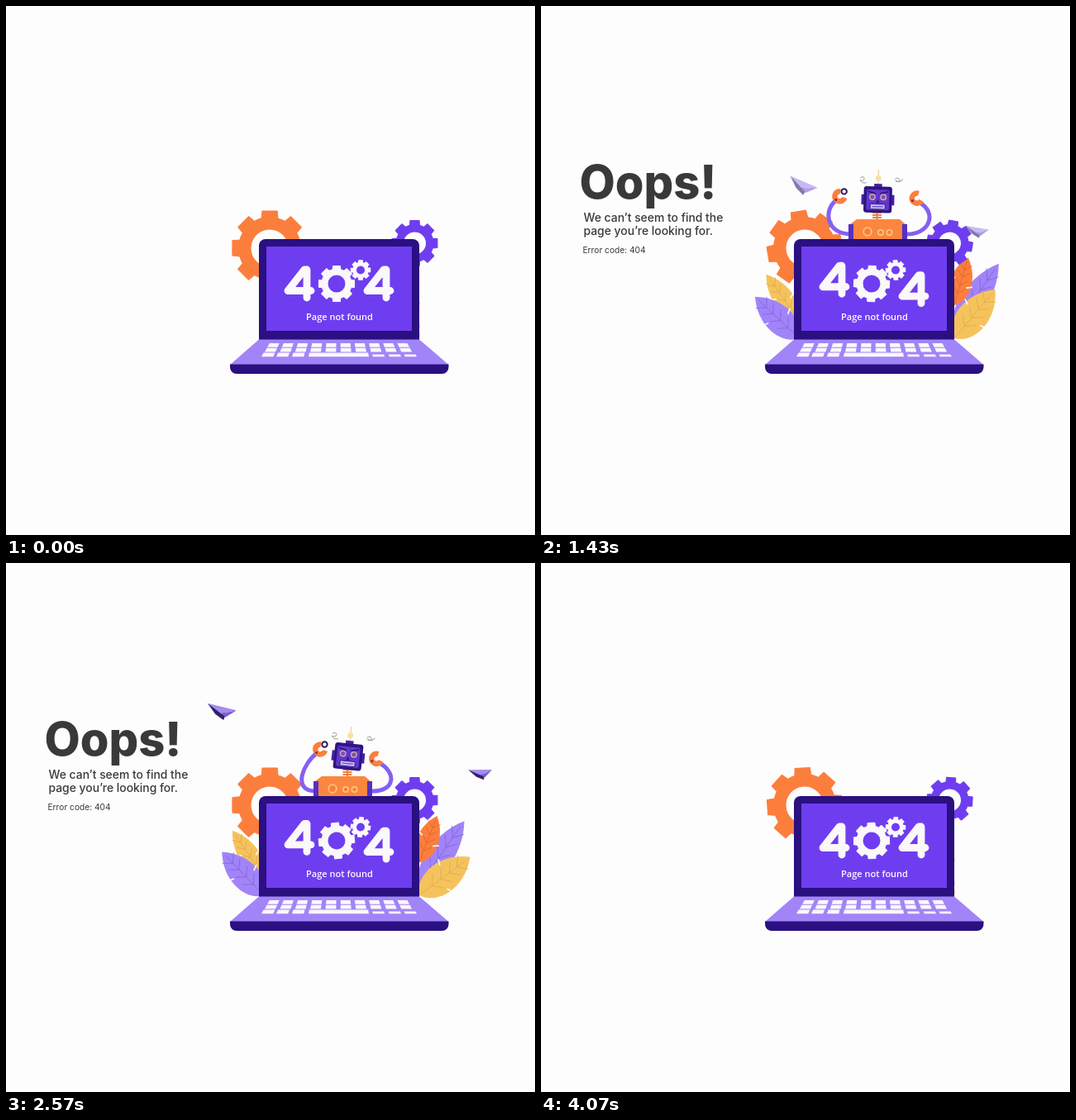
These frames come from a looping animation (640x640 px, 4.11 s). An HTML page:

```html
<!DOCTYPE html>
<html lang="en">
<head>
<meta charset="utf-8">
<title>404</title>
<style>
  html, body { margin: 0; width: 100%; height: 100%; overflow: hidden; background: #fdfdfd; }
  svg { display: block; width: 100vw; height: 100vh; }
  .copy { fill: #39393c; font: 500 13.9px Inter, sans-serif; }
  #title { font: 800 56px Inter, sans-serif; }
  #code { font: 400 10.2px Inter, sans-serif; }
  .screen { fill: #fdfbff; font: 600 11px "Open Sans", "Noto Sans", sans-serif; text-anchor: middle; }
  .four { fill: none; stroke: #faf8fb; stroke-width: 8.8; stroke-linecap: round; stroke-linejoin: round; }
</style>
</head>
<body>
<svg id="stage" viewBox="0 0 640 640"></svg>
<script>
const LOOP = 4110;
const ORANGE = '#fc7e3d', PURPLE = '#6f3df0', LILAC = '#a184f8', DARK = '#2a1080',
      YELLOW = '#f5c35c', CREAM = '#faf8fb', PAPER = '#fdfdfd';

// Smooth curve through time/value pairs, flat at its extremes.
function track(...p) {
  const n = p.length / 2, T = i => p[2 * i], V = i => p[2 * i + 1];
  const rate = i => (V(i + 1) - V(i)) / (T(i + 1) - T(i));
  const tangent = i => {
    if (i < 1 || i > n - 2) return 0;
    const a = rate(i - 1), b = rate(i);
    return a * b > 0 ? 2 * a * b / (a + b) : 0;
  };
  return t => {
    if (t <= T(0)) return V(0);
    if (t >= T(n - 1)) return V(n - 1);
    let i = 0;
    while (t > T(i + 1)) i++;
    const d = T(i + 1) - T(i), u = (t - T(i)) / d, w = 1 - u;
    return V(i) * (1 + 2 * u) * w * w + V(i + 1) * u * u * (3 - 2 * u)
      + d * u * w * (tangent(i) * w - tangent(i + 1) * u);
  };
}

function gear(id, R, r, hole, color) {
  const at = (rad, a) => `${(rad * Math.sin(a)).toFixed(2)} ${(-rad * Math.cos(a)).toFixed(2)}`;
  let d = '';
  for (let i = 0; i < 8; i++) {
    const a = i * Math.PI / 4;
    d += (i ? `A${r} ${r} 0 0 1 ` : 'M') + at(r, a - .27)
      + 'L' + at(R, a - .2) + 'L' + at(R, a + .2) + 'L' + at(r, a + .27);
  }
  d += `A${r} ${r} 0 0 1 ${at(r, -.27)}ZM${hole} 0A${hole} ${hole} 0 1 0 ${-hole} 0A${hole} ${hole} 0 1 0 ${hole} 0Z`;
  return `<path id="${id}" d="${d}" fill="${color}" fill-rule="evenodd" stroke="${color}" stroke-linejoin="round"/>`;
}

function leaf(id, len, w, color, vein) {
  const y = k => -k * len;
  let ribs = '';
  for (const k of [.25, .42, .59, .74])
    ribs += `M0 ${y(k)}L${-w * .5} ${y(k + .12)}M0 ${y(k)}L${w * .5} ${y(k + .12)}`;
  return `<g id="${id}">
    <path fill="${color}" d="M0 0C${-w} ${y(.12)} ${-w * 1.35} ${y(.62)} 0 ${y(1)}C${w * 1.35} ${y(.62)} ${w} ${y(.12)} 0 0"/>
    <path d="M${w} ${y(.45)}l-7 3M${-w} ${y(.58)}l7 3" stroke="${PAPER}" stroke-width="1.6"/>
    <path d="M0 0V${y(.92)}${ribs}" fill="none" stroke="${vein}" stroke-width=".7"/></g>`;
}

function keys() {
  const X = (u, y) => 403 + u * (86 + (y - 408) * .55);
  const key = (a, b, y, h) =>
    `M${X(a, y)} ${y}L${X(b, y)} ${y}L${X(b, y + h)} ${y + h}L${X(a, y + h)} ${y + h}Z`;
  let d = '';
  for (const y of [408, 413.8])
    for (let i = 0; i < 10; i++) d += key(i / 5 - .98, i / 5 - .84, y, 4.7);
  for (const a of [-.99, -.8, -.6]) d += key(a, a + .15, 419.4, 4.8);
  d += key(-.39, .38, 419.4, 4.8);
  for (const a of [.43, .64, .84]) d += key(a, a + .15, 421.6, 2.6);
  return `<path d="${d}" fill="${CREAM}"/>`;
}

const claw = `<path d="M2 -6.5A6 6 0 1 0 7 1" fill="none" stroke="${ORANGE}" stroke-width="6.5"/>
  <circle cx="-3.5" cy="3.5" r="1.6" fill="#7a3550"/>`;
const eye = x => `<circle cx="${x}" cy="-3" r="4.2" fill="#c9a5a8"/><circle cx="${x}" cy="-3" r="2.6" fill="#7b4fae"/>`;
const plane = id => `<g id="${id}">
  <path d="M-17 -11L-9 3L0 11L4 4Z" fill="#33206b"/>
  <path d="M-17 -11L17 1L-2 3Z" fill="#a48cf0"/>
  <path d="M-2 3L17 1L3 8Z" fill="#7b5fd6"/></g>`;
const four = (id, x) => `<path id="${id}" class="four" d="M${x + 28} 353V319H${x + 25}L${x + 5} 344.5H${x + 33}"/>`;

stage.innerHTML = `
  ${leaf('ly', 68, 14, YELLOW, '#dda850')}${leaf('lp', 73, 19, LILAC, '#7d61dc')}
  ${leaf('rp', 95, 18, LILAC, '#7d61dc')}${leaf('ry', 77, 21, YELLOW, '#dda850')}
  ${leaf('ro', 60, 15, ORANGE, '#d9652c')}
  ${gear('bigGear', 46, 37.5, 23, ORANGE)}${gear('sideGear', 28, 22.5, 14, PURPLE)}
  <g id="robot">
    <g fill="none" stroke="#8560f2" stroke-width="5"><path id="armL"/><path id="armR"/></g>
    <g id="handL">${claw}<circle cx="6.5" cy="-6.5" r="3.2" fill="${PAPER}" stroke="#2b1763" stroke-width="2"/></g>
    <g id="handR">${claw}</g>
    <path id="neck" d="M-5.5 250H5.5M-5.5 253H5.5M-5.5 256H5.5M0 248V260" stroke="#ee8145" stroke-width="2.2"/>
    <path d="M382 258H434L441 264V290H374V264Z" fill="#fb863f"/>
    <path d="M372 264h6v26h-6zM437 264h6v26h-6z" fill="#5630c4"/>
    <g fill="${ORANGE}" stroke="#fac47a" stroke-width="1.8"><circle cx="395" cy="273" r="4.8"/>
      <circle cx="411" cy="274" r="3.2"/><circle cx="421.5" cy="274" r="3.2"/></g>
    <g id="head">
      <path d="M0 -18V-38" stroke="#e9cf8c" stroke-width="1.2"/><circle cy="-27" r="3.6" fill="#f6e0a4"/>
      <path d="M-5 -20H5V-15H-5ZM-21 -6H21V7H-21Z" fill="#4522a8"/>
      <rect x="-18" y="-16.5" width="36" height="33.5" rx="3.5" fill="#2f1580"/>
      <rect x="-14.5" y="-12.5" width="29" height="26" rx="2" fill="#6036cf"/>
      <path d="M-13 -10L-3 -7.5M13 -10L3 -7.5" stroke="#2f1580" stroke-width="1.8"/>
      ${eye(-7)}${eye(7)}
      <path d="M0 0L2.5 4.5H-2.5Z" fill="#2f1580"/>
      <rect x="-9.5" y="6" width="19" height="6.5" rx="1" fill="#cbbcf6" stroke="#2f1580"/>
      <path d="M-7 9.2H7" stroke="#6843cf" stroke-width="1.2"/>
      <g id="curls" fill="none" stroke="#8b8b92" stroke-width=".9">
        <path d="M-23 -27q5 -3 5 1t-5 2q2 5 8 3"/><path d="M21 -26q4 -4 6 0t-5 2q8 2 9 -3"/></g>
    </g>
  </g>
  <path d="M306 404V290a8 8 0 0 1 8 -8H492a8 8 0 0 1 8 8V404Z" fill="${DARK}"/>
  <path d="M315 291H491V393H315Z" fill="${PURPLE}"/>
  <path d="M306 403.500H500L535.500 434H271Z" fill="${LILAC}"/>
  <path d="M271 433.500H535.500V437a8 8 0 0 1 -8 8H279a8 8 0 0 1 -8 -8Z" fill="${DARK}"/>
  ${keys()}
  ${four('fourL', 336)}${four('fourR', 432)}
  ${gear('zero', 22, 18, 11, CREAM)}${gear('tiny', 12, 9.3, 5.5, CREAM)}
  <text class="screen" x="403.500" y="379.500">Page not found</text>
  ${plane('planeL')}${plane('planeR')}
  <text id="title" class="copy" x="46.500" y="233">Oops!</text>
  <text id="body" class="copy"><tspan x="51.500" y="261">We can’t seem to find the</tspan><tspan x="51.500" y="277">page you’re looking for.</tspan></text>
  <text id="code" class="copy" x="50.500" y="298.500">Error code: 404</text>`;

const $ = id => document.getElementById(id);
const place = (id, x, y, turn = 0, size = 1) =>
  $(id).setAttribute('transform', `translate(${x} ${y}) rotate(${turn}) scale(${size})`);
const fade = (id, v) => $(id).setAttribute('opacity', v);
// Values at the main poses.
const poses = (a, b, c, d, e) => track(570, a, 1030, b, 1830, c, 2570, d, 3570, e);
const sway = (start, a, b, c, d, e) =>
  track(80, start, 570, a, 1030, b, 1830, c, 2570, d, 3150, d, 3570, e, 3950, start);

const leaves = [
  ['ly', 312, 380, sway(40, -32, -38, -33, -34, -29)],
  ['lp', 312, 402, sway(40, -22, -51, -42, -44, -23)],
  ['rp', 500, 390, sway(-40, 30, 36, 33, 35, 30)],
  ['ry', 500, 402, sway(-45, 19, 42, 38, 53, 39)],
  ['ro', 500, 362, sway(-45, 10, 15, 17, 21, 9)],
];
const grow = {
  lp: track(80, .5, 570, 1, 3300, 1, 3570, .93, 3950, .5),
  rp: track(80, .4, 570, 1, 3200, 1, 3570, .73, 3950, .4),
  ry: track(80, .4, 570, .92, 1030, 1, 3200, 1, 3570, .72, 3950, .4),
  ro: track(80, .4, 570, .8, 1030, 1, 3200, 1, 3570, .6, 3950, .4),
};
const rise = track(60, 112, 570, 24, 1030, 0, 3150, 0, 3570, 35, 3950, 112);
const headX = poses(412, 405, 411, 414, 417), tilt = poses(-2, 0, 3, 6, 7);
const leftX = poses(373, 359, 363, 379, 386), leftY = poses(228, 232, 229, 226, 227);
const rightX = poses(453, 460, 447, 447, 463), rightY = poses(239, 237, 230, 237, 246);
const curlFade = track(820, 0, 1030, 1, 3000, 1, 3300, 0);
const planeFade = track(1150, 0, 1650, 1, 3150, 1, 3680, 0);
const flight = (a, b, c, d, e) => track(1200, a, 1830, b, 2570, c, 3200, d, 3680, e);
const pLX = flight(322, 301, 262, 243, 237), pLY = flight(221, 205, 179, 171, 167);
const pRX = flight(525, 542, 575, 590, 593), pRY = flight(274, 265, 254, 250, 249);
const pTurn = flight(5, 0, -6, -8, -8);
const copy = [
  ['title', track(120, 0, 570, .58, 900, 1, 3450, 1, 3570, .86, 4075, 0), 38, 1335],
  ['body', track(180, 0, 570, .48, 920, 1, 3520, 1, 4070, 0), 56, 1456],
  ['code', track(240, 0, 570, .42, 950, 1, 3520, 1, 4070, 0), 56, 1456],
];

function draw(t) {
  const turn = t / LOOP * 360;
  place('bigGear', 319, 293, turn);
  place('sideGear', 494.5, 287, -turn);
  place('zero', 400, 336, turn * .375);
  place('tiny', 429, 319.5, -turn * .375);
  // The digits part twice per loop and hold for a moment.
  const part = Math.min(1, 1.3 * Math.sin(turn * Math.PI / 180) ** 2);
  const bob = part * part * (3 - 2 * part);
  place('fourL', 0, -5 * bob);
  place('fourR', 0, 7 * bob);

  for (const [id, x, y, angle] of leaves)
    place(id, x, y, angle(t), grow[id] ? grow[id](t) : 1);

  const lx = leftX(t), ly = leftY(t), rx = rightX(t), ry = rightY(t);
  place('robot', 0, rise(t));
  place('head', headX(t), 234, tilt(t), .95);
  place('neck', headX(t) - 1, 0);
  place('handL', lx, ly);
  place('handR', rx, ry, 12);
  $('armL').setAttribute('d', `M375 276C345 276 ${lx - 19} ${ly + 16} ${lx - 3} ${ly + 4}`);
  $('armR').setAttribute('d', `M440 276C471 278 ${rx + 27} ${ry + 16} ${rx + 3} ${ry + 4}`);
  fade('curls', curlFade(t));

  place('planeL', pLX(t), pLY(t), pTurn(t));
  place('planeR', pRX(t), pRY(t), pTurn(t) - 14, .8);
  fade('planeL', planeFade(t));
  fade('planeR', planeFade(t));

  for (const [id, alpha, drop, end] of copy) {
    fade(id, alpha(t));
    place(id, 0, drop * (Math.max(0, end - t) / (end - 570)) ** 2);
  }
}

const begin = performance.now();
(function tick() {
  draw((performance.now() - begin) % LOOP);
  requestAnimationFrame(tick);
})();
</script>
</body>
</html>
```
